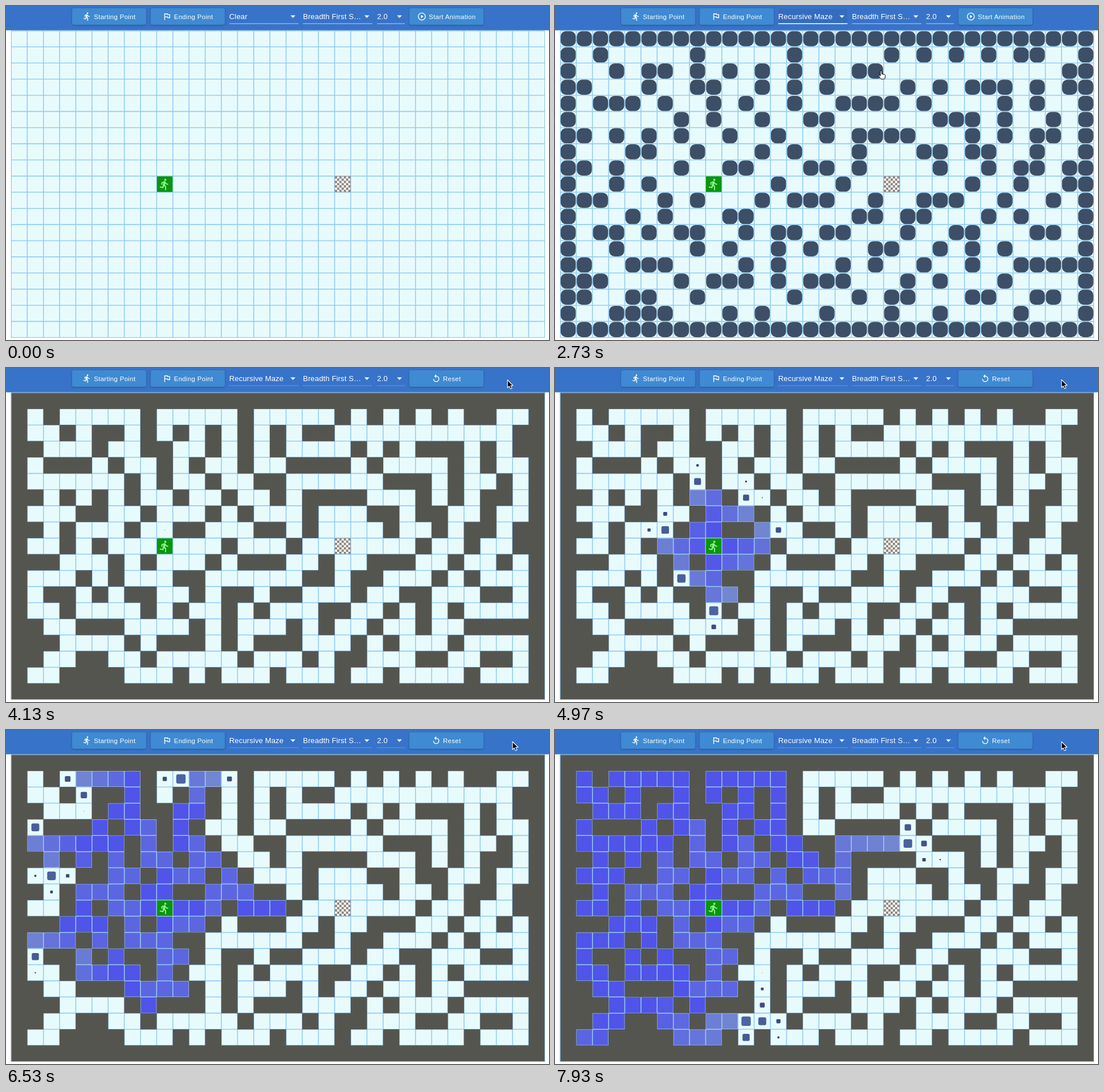
Recreate the animation shown at these times as an HTML page. Size 953 px wide and 587 px high, loop 8 s.

```html
<!DOCTYPE html>
<html lang="en">
<head>
<meta charset="utf-8">
<title>Path finder</title>
<style>
  html, body { margin: 0; width: 100%; height: 100%; overflow: hidden; background: #fff; }
  svg { display: block; width: 953px; height: 587px; font-family: "Liberation Sans", Arial, sans-serif; }
  text { white-space: pre; }
  .button { fill: #3f8ad2; filter: drop-shadow(0 1.4px 1.4px rgba(0,0,0,.28)); }
  .label { font-size: 11.44px; letter-spacing: .327px; fill: #fff; }
  .value { font-size: 13.07px; letter-spacing: .123px; fill: #fff; }
  .item { font-size: 13.07px; letter-spacing: .123px; fill: rgba(0,0,0,.87); }
  .panel { fill: #fff; filter: drop-shadow(0 3px 4px rgba(0,0,0,.3)); }
</style>
</head>
<body>
<svg id="stage" viewBox="0 0 953 587" xmlns="http://www.w3.org/2000/svg"></svg>
<script>
const LOOP = 8000, COLS = 33, ROWS = 19, PITCH = 28.39, LEFT = 8.9, TOP = 43.4;
const START = [9, 9], GOAL = [20, 9];
const MENU_OPEN = 1010, MENU_CLOSE = 1800, WALLS_AT = 2390, RUN_AT = 3900;
const VISIT_AT = 4090, VISIT_STEP = 25, POP = 325, GROWTH = 0.052;

const MAZE = [
  "#".repeat(COLS),
  "#.#.....#.....#.....#.#.#.#.##..#",
  "#..#.##.#.#.#.#.#.##...........##",
  "##...#..##..#.#.#....#.#.###.#.##",
  "#.###.#..#.#..#..####.#....#.#..#",
  "#......#.#..#..##......###.#..#.#",
  "##.#.#.#..#..#..#.####...#.#.##.#",
  "#...##..#...#.#...#...##.##..#..#",
  "##.#...#..##...##.#....#..#.##.##",
  "#..#.#.......#...#.......#..#..##",
  "###...#.#...#.###..#..###..#..#.#",
  "#...#.#...##......##.##...#.#...#",
  "#.##.#.##..#.##.##...#..##...##.#",
  "#..#....#.#..#.#...##..#.#.#....#",
  "##..###....#.#...#.#..#..#..#####",
  "###....#.###.#.###...#.#...#....#",
  "##..##..#.....#...#.##...##..##.#",
  "#..####...#.#...#...#..#....#...#",
  "#".repeat(COLS)
];

const ICONS = {
  run: "M13.49 5.48c1.1 0 2-.9 2-2s-.9-2-2-2-2 .9-2 2 .9 2 2 2zm-3.6 13.9l1-4.4 2.1 2v6h2v-7.5l-2.1-2 .6-3c1.3 1.5 3.3 2.5 5.5 2.5v-2c-1.9 0-3.5-1-4.3-2.4l-1-1.6c-.4-.6-1-1-1.7-1-.3 0-.5.1-.8.1l-5.2 2.2v4.7h2v-3.4l1.8-.7-1.6 8.1-4.9-1-.4 2 7 1.4z",
  flag: "M12.36 6l.4 2H18v6h-3.36l-.4-2H7V6h5.36M14 4H5v17h2v-7h5.6l.4 2h7V6h-5.6L14 4z",
  play: "M10 16.5l6-4.5-6-4.5v9zM12 2C6.48 2 2 6.48 2 12s4.48 10 10 10 10-4.48 10-10S17.52 2 12 2zm0 18c-4.41 0-8-3.59-8-8s3.59-8 8-8 8 3.59 8 8-3.59 8-8 8z",
  replay: "M12 5V1L7 6l5 5V7c3.31 0 6 2.69 6 6s-2.69 6-6 6-6-2.69-6-6H4c0 4.42 3.58 8 8 8s8-3.58 8-8-3.58-8-8-8z"
};

// Spans in which the picture stands still
const HOLDS = [[430, 600], [800, 970], [1570, 1770], [2530, 2700]];

// Pointer position: time, x, y
const POINTER = [
  [400, 90, 9], [600, 90, 9], [680, 180, 48], [800, 415, 20], [970, 415, 20],
  [1070, 419, 16.5], [1200, 421, 22], [1500, 435, 88], [1850, 435, 88],
  [2400, 571, 114], [2800, 571, 114], [3500, 735, 64], [3750, 772, 22],
  [3920, 772, 22], [4120, 880, 21], [4260, 889, 20.5]
];

const stage = document.getElementById("stage");

function el(tag, attrs, parent = stage, text) {
  const node = document.createElementNS("http://www.w3.org/2000/svg", tag);
  set(node, attrs);
  if (text) node.textContent = text;
  parent.appendChild(node);
  return node;
}
function set(node, attrs) {
  for (const key in attrs) node.setAttribute(key, attrs[key]);
}
const show = (node, on) => set(node, { display: on ? "inline" : "none" });
const clamp = v => Math.max(0, Math.min(1, v));
const span = (t, a, b) => clamp((t - a) / (b - a));
const lerp = (a, b, p) => a + (b - a) * p;
const ease = p => p * p * (3 - 2 * p);
const mix = (a, b, p) => `rgb(${a.map((v, i) => Math.round(lerp(v, b[i], p)))})`;
const cellX = c => LEFT + c * PITCH;
const cellY = r => TOP + r * PITCH;

function icon(name, cx, cy, size, fill, parent) {
  const k = size / 24;
  return el("path", { d: ICONS[name], fill, transform: `translate(${cx - size / 2} ${cy - size / 2}) scale(${k})` }, parent);
}

function roundRect(cx, cy, size, r) {
  const s = size - 2 * r, a = (x, y) => `a${r} ${r} 0 0 1 ${x} ${y}`;
  return `M${cx - s / 2} ${cy - size / 2}h${s}${a(r, r)}v${s}${a(-r, r)}h${-s}${a(-r, -r)}v${-s}${a(r, -r)}z`;
}

// Breadth first order: up, right, down, left
function searchOrder(limit) {
  const queue = [START], seen = new Set([START.join()]);
  for (let i = 0; i < queue.length && queue.length < limit; i++) {
    const [c, r] = queue[i];
    for (const [dc, dr] of [[0, -1], [1, 0], [0, 1], [-1, 0]]) {
      const next = [c + dc, r + dr];
      if (MAZE[next[1]][next[0]] === "#" || seen.has(next.join())) continue;
      seen.add(next.join());
      queue.push(next);
    }
  }
  return queue;
}

// Board
el("rect", { x: LEFT, y: TOP, width: COLS * PITCH, height: ROWS * PITCH, fill: "#92cdf4" });
let cells = "";
const walls = [];
for (let r = 0; r < ROWS; r++) {
  for (let c = 0; c < COLS; c++) {
    cells += `M${cellX(c) + .8} ${cellY(r) + .8}h${PITCH - 1.6}v${PITCH - 1.6}h${1.6 - PITCH}z`;
    if (MAZE[r][c] === "#") walls.push([cellX(c) + PITCH / 2, cellY(r) + PITCH / 2]);
  }
}
el("path", { d: cells, fill: "#e8fbfc" });

const visits = searchOrder(160).slice(1).map(([c, r], i) => ({
  x: cellX(c) + PITCH / 2, y: cellY(r) + PITCH / 2, at: VISIT_AT + VISIT_STEP * (i + 1),
  fade: i + 1 >= 8 && i + 1 <= 41 ? .66 : 1, node: el("rect", {})
}));
const wallPath = el("path", {});
el("rect", { x: LEFT + .4, y: TOP + .4, width: COLS * PITCH - .8, height: ROWS * PITCH - .8, fill: "none", stroke: "#7fbde8", "stroke-width": .8 });

// Start and goal cells
const [sx, sy] = [cellX(START[0]), cellY(START[1])], [gx, gy] = [cellX(GOAL[0]), cellY(GOAL[1])];
el("rect", { x: sx + .5, y: sy + .5, width: PITCH - 1, height: PITCH - 1, fill: "#0a960c" });
icon("run", sx + PITCH / 2 - .4, sy + PITCH / 2 + .3, 22.4, "#8ff08e");
el("rect", { x: gx + .5, y: gy + .5, width: PITCH - 1, height: PITCH - 1, fill: "#fff", stroke: "#9c9690", "stroke-width": .8 });
let checks = "";
const q = (PITCH - 1) / 7;
for (let i = 0; i < 49; i += 2) checks += `M${gx + .5 + i % 7 * q} ${gy + .5 + Math.floor(i / 7) * q}h${q}v${q}h${-q}z`;
el("path", { d: checks, fill: "#8e867e" });

// Tool bar
el("rect", { width: 953, height: 42.7, fill: "#3773c9" });
function button(x) {
  return el("rect", { x, y: 4, width: 130, height: 29, rx: 3.2, class: "button" });
}
button(116);
icon("run", 142, 18.5, 16.3, "#fff");
el("text", { x: 154.2, y: 22.7, class: "label" }, stage, "Starting Point");
button(254);
icon("flag", 282.6, 18.5, 16.3, "#fff");
el("text", { x: 294.7, y: 22.7, class: "label" }, stage, "Ending Point");

const action = button(708);
const startLabel = el("g", {}), resetLabel = el("g", {});
icon("play", 729.8, 18.5, 16.3, "#fff", startLabel);
el("text", { x: 742, y: 22.7, class: "label" }, startLabel, "Start Animation");
icon("replay", 755, 18.5, 16.3, "#fff", resetLabel);
el("text", { x: 767, y: 22.7, class: "label" }, resetLabel, "Reset");

function select(x, width, value) {
  const focus = el("rect", { x, y: 5, width, height: 26, fill: "#000", opacity: .05 });
  const text = el("text", { x, y: 23.2, class: "value" }, stage, value);
  const arrow = el("path", { d: "M-4.3 -2h8.6l-4.3 4.3z", fill: "#fff" });
  const line = el("path", { d: `M${x} 31h${width}`, stroke: "#fff" });
  return { focus, text, arrow, line, ax: x + width - 9.6 };
}
const mazeSelect = select(391.8, 121.4, "Clear");
const selects = [mazeSelect, select(521.3, 121.6, "Breadth First S…"), select(651.3, 48.8, "2.0")];

// Drop-down list
const menu = el("g", {});
el("rect", { width: 122, height: 131, rx: 3.2, class: "panel" }, menu);
el("rect", { y: 36, width: 122, height: 29.4, fill: "#1976d2", opacity: .09 }, menu);
const hover = el("rect", { y: 65.4, width: 122, height: 29.4, fill: "#000", opacity: .05 }, menu);
["Choose a Maze", "Clear", "Recursive Maze", "Scatter"].forEach((name, i) =>
  el("text", { x: 13.1, y: 25.8 + i * 29.4, class: "item" }, menu, name));

// Pointer
const pointer = el("g", { "stroke-linejoin": "round" });
const arrowTip = el("path", { d: "M0 0V13.8L3 11L5.3 15.8L7.8 14.6L5.5 10H9.8Z", fill: "#000", stroke: "#fff", "stroke-width": 1.1 }, pointer);
const hand = el("path", {
  d: "M0 8V1.3a1.3 1.3 0 0 1 2.6 0V5.4l5 1.2q1.4.4 1.2 1.8l-.8 4.8q-.2 1.2-1.4 1.2H1.9q-.9 0-1.5-.8L-3.4 8.6q.7-1.5 2.2-.6L0 9z",
  fill: "#fff", stroke: "#000", "stroke-width": 1
}, pointer);

function pointerAt(t) {
  let i = 0;
  while (i < POINTER.length - 2 && t > POINTER[i + 1][0]) i++;
  const [a, b] = [POINTER[i], POINTER[i + 1]], p = ease(span(t, a[0], b[0]));
  return [lerp(a[1], b[1], p), lerp(a[2], b[2], p)];
}

function drawWalls(age) {
  show(wallPath, age > 0);
  if (age <= 0) return;
  const late = span(age, POP, 1500);
  const size = age < POP ? age * GROWTH
    : age < 700 ? lerp(26.5, 32, ease(span(age, POP, 700)))
    : lerp(32, PITCH + .25, ease(span(age, 700, 1110)));
  const r = size * lerp(.36, 0, late);
  set(wallPath, {
    d: walls.map(([x, y]) => roundRect(x, y, size, r)).join(""),
    fill: mix([61, 79, 102], [85, 85, 80], late)
  });
}

function drawVisit(v, t) {
  const age = t - v.at, full = age >= POP;
  show(v.node, age > 0);
  if (age <= 0) return;
  const size = full ? PITCH - 1.4 : age * GROWTH;
  set(v.node, {
    x: v.x - size / 2, y: v.y - size / 2, width: size, height: size, rx: full ? 0 : size * .2,
    fill: full ? mix([115, 136, 208], [80, 84, 233], Math.min(v.fade, span(age, POP, 850)))
      : mix([44, 58, 100], [78, 102, 166], age / POP)
  });
}

function draw(time) {
  const hold = HOLDS.find(h => time > h[0] && time < h[1]);
  const t = hold ? hold[0] : time;
  const running = t >= RUN_AT;

  drawWalls(t - WALLS_AT);
  visits.forEach(v => drawVisit(v, t));

  mazeSelect.text.textContent = t < MENU_CLOSE ? "Clear" : "Recursive Maze";
  selects.forEach((s, i) => {
    const active = i === 0 && t > 740 && !running, open = i === 0 && t > 1000 && t < MENU_CLOSE;
    show(s.focus, active && t > 1000);
    set(s.arrow, { transform: `translate(${s.ax} 18.6)${open ? " scale(1 -1)" : ""}` });
    set(s.line, {
      "stroke-width": active ? 1.5 : .9, "stroke-opacity": active ? 1 : .75,
      "stroke-dasharray": running ? ".9 1.5" : "none"
    });
  });

  set(action, { style: `fill:${t > 3680 && t < 4030 ? "#387fc9" : "#3f8ad2"}` });
  show(startLabel, !running);
  show(resetLabel, running);

  const grow = ease(span(t, MENU_OPEN, MENU_OPEN + 178));
  const alpha = ease(span(t, MENU_OPEN, MENU_OPEN + 267)) * (1 - ease(span(t, MENU_CLOSE, MENU_CLOSE + 220)));
  show(menu, alpha > 0);
  set(menu, { opacity: alpha, transform: `translate(392 9.7) scale(${lerp(.75, 1, grow)} ${lerp(.5625, 1, grow)})` });
  show(hover, t > 1420);

  const [x, y] = pointerAt(t), pressing = t > 1180 && t < 4020;
  show(pointer, t >= 400);
  set(pointer, { transform: `translate(${x} ${y})` });
  show(arrowTip, !pressing);
  show(hand, pressing);
}

const begin = performance.now();
function tick() {
  draw((performance.now() - begin) % LOOP);
  requestAnimationFrame(tick);
}
tick();
</script>
</body>
</html>
```
